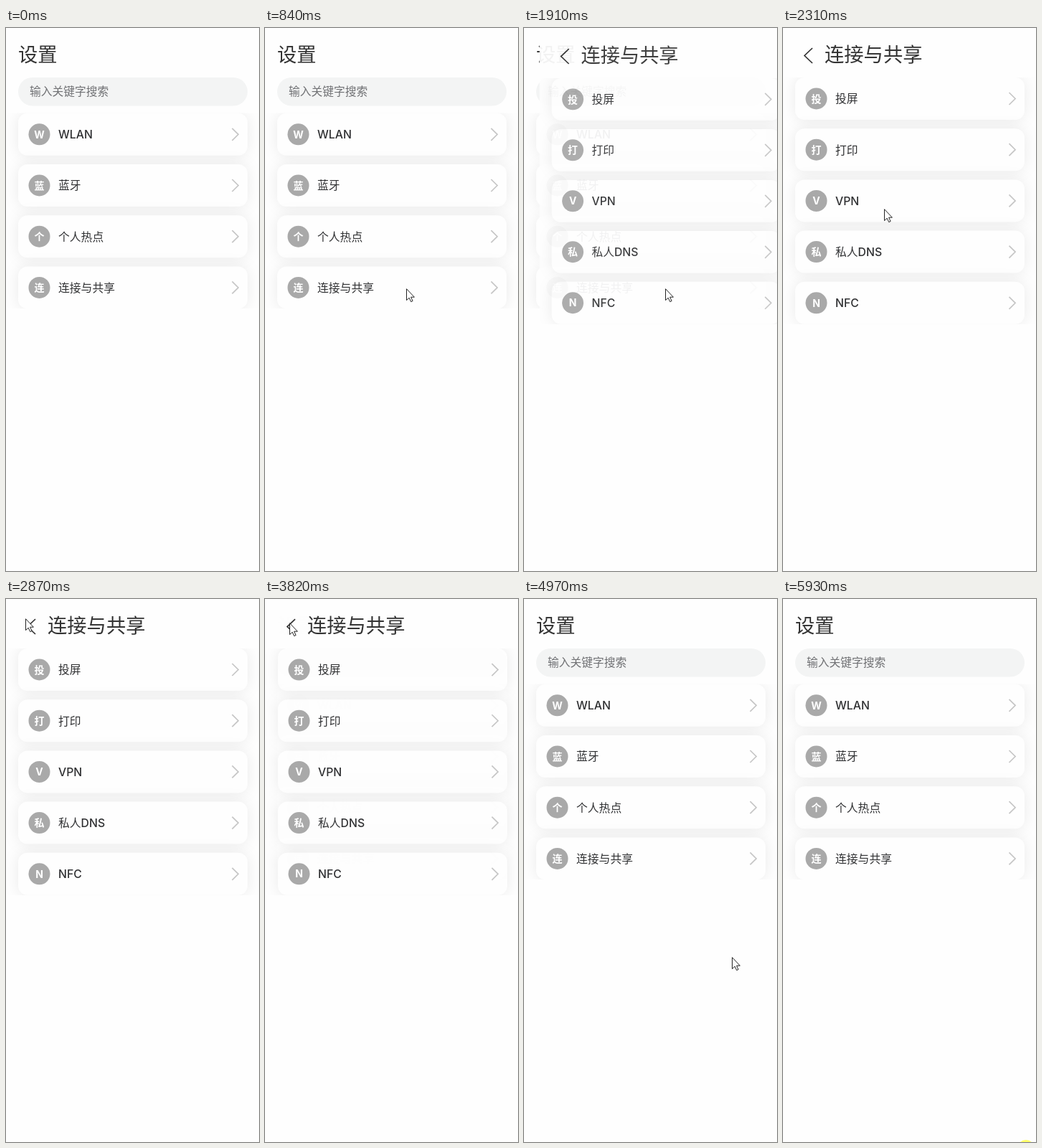
Recreate the animation shown at these times as an HTML page. Size 353 px wide and 757 px high, loop 6060 ms.

```html
<!DOCTYPE html>
<html lang="zh-CN">
<head>
<meta charset="utf-8">
<title>设置</title>
<style>
  html, body { margin: 0; width: 100%; height: 100%; overflow: hidden; background: #fefefe; }
  svg { display: block; width: 100%; height: 100%; }
  text { font-family: Inter, "Noto Sans CJK SC", "Noto Sans CJK", sans-serif; fill: #303133; }
  .title { font-size: 27.3px; fill: #333; }
  .hint { font-size: 15.75px; fill: #707174; }
  .label { font-size: 15.8px; font-weight: 500; }
  .initial { font-size: 14px; font-weight: 700; fill: #fff; text-anchor: middle; }
  .line { fill: none; stroke-width: 1.7; }
</style>
</head>
<body>
<svg viewBox="0 0 353 757">
  <defs>
    <filter id="shadow" filterUnits="userSpaceOnUse" x="-30" y="20" width="420" height="440"
            color-interpolation-filters="sRGB">
      <feDropShadow dx="0" dy="0" stdDeviation="10" flood-color="#000" flood-opacity=".08"/>
    </filter>
    <clipPath id="mainClip"><rect y="118.5" width="353" height="272.5"/></clipPath>
    <clipPath id="subClip"><rect y="69" width="353" height="344"/></clipPath>
  </defs>
  <g>
    <rect width="353" height="757" fill="#fefefe"/>
    <text class="title" x="17" y="47.3">设置</text>
    <rect x="17" y="69" width="320" height="39.5" rx="19.75" fill="#f3f4f4"/>
    <text class="hint" x="33" y="94.3">输入关键字搜索</text>
    <g id="mainList" clip-path="url(#mainClip)"></g>
  </g>
  <g id="sub">
    <rect width="353" height="757" fill="#fefefe"/>
    <path class="line" d="M41 28L30 38.5L41 49" stroke="#333"/>
    <text class="title" x="58" y="47.3">连接与共享</text>
    <g id="subList" clip-path="url(#subClip)"></g>
  </g>
  <circle id="click" r="12" fill="#ffff00" fill-opacity=".6"/>
  <path id="cursor" d="M.5 .7V16.6L4.2 13.2L6.7 18.6L9.1 17.5L6.6 12.2H11.4Z"
        fill="#fff" stroke="#222" stroke-width="1" stroke-linejoin="round"/>
</svg>
<script>
const LOOP = 6060, W = 353, H = 757;
const $ = id => document.getElementById(id);
const lerp = (a, b, k) => a + (b - a) * k;
const clamp = v => Math.min(1, Math.max(0, v));
const span = (t, start, length) => clamp((t - start) / length);
const smooth = u => u * u * (3 - 2 * u);

function buildList(id, top, labels) {
  $(id).innerHTML = labels.map((label, i) => {
    const y = top + i * 71.2;
    return `<rect x="17" y="${y}" width="320" height="59" rx="13" fill="#fefefe" filter="url(#shadow)"/>
      <circle cx="46.5" cy="${y + 29.5}" r="15" fill="#a9a9a9"/>
      <text class="initial" x="46.5" y="${y + 34.7}">${label[0]}</text>
      <text class="label" x="73" y="${y + 35.3}">${label}</text>
      <path class="line" d="M315.5 ${y + 21}l8.6 8.5l-8.6 8.5" stroke="#c6c6c6"/>`;
  }).join("");
}
buildList("mainList", 118.8, ["WLAN", "蓝牙", "个人热点", "连接与共享"]);
buildList("subList", 69, ["投屏", "打印", "VPN", "私人DNS", "NFC"]);

// The screen refreshes in steps: [start, interval]
const ticks = [[0, 200], [200, 70], [1300, 70], [1700, 70], [2170, 70], [3000, 70],
  [3820, 130], [3950, 70], [4220, 70], [4480, 70]];
function snap(t) {
  const [start, step] = ticks.filter(tick => tick[0] <= t).pop();
  return start + Math.floor((t - start) / step) * step;
}

function cursorAt(t) {
  if (t < 2170) {
    const k = smooth(span(t, 80, 760));
    return [lerp(318, 197, k) - 56 * Math.sin(Math.PI * k), lerp(765, 363, k)];
  }
  if (t < 3000) {
    const k = 1 - (1 - span(t, 2170, 700)) ** 1.8;
    return [lerp(197, 27, k), lerp(363, 27, k)];
  }
  if (t < 4480) {
    const k = span(t, 3000, 210);
    return [lerp(27, 34, k), lerp(27, 33, k)];
  }
  const k = smooth(Math.sqrt(span(t, 4480, 1400)));
  return [lerp(34, 339, 1 - (1 - k) ** 1.8), lerp(33, 766, k)];
}

function pageProgress(t) {
  return t < 3000 ? 1 - (1 - span(t, 1663, 406)) ** 3 : 1 - span(t, 3798, 410) ** 2;
}

const clicks = [[1170, 1300, 197, 363], [3540, 3670, 34, 33], [5930, LOOP, 339, 766]];

function show(el, visible) {
  el.setAttribute("visibility", visible ? "visible" : "hidden");
}

function render(now) {
  const t = snap(now);

  const p = pageProgress(t), scale = 0.95 + 0.05 * p;
  const x = (1 - p) * W + (1 - scale) * W / 2, y = (1 - scale) * H / 2;
  show($("sub"), p > 0);
  $("sub").setAttribute("opacity", p);
  $("sub").setAttribute("transform", `translate(${x} ${y}) scale(${scale})`);

  show($("cursor"), now >= 200 && now < 5740);
  $("cursor").setAttribute("transform", `translate(${cursorAt(t).map(Math.round)})`);

  const click = clicks.find(c => now >= c[0] && now < c[1]);
  show($("click"), !!click);
  if (click) $("click").setAttribute("transform", `translate(${click[2]} ${click[3]})`);
}

const origin = performance.now();
function frame() {
  render((performance.now() - origin) % LOOP);
  requestAnimationFrame(frame);
}
frame();
</script>
</body>
</html>
```
